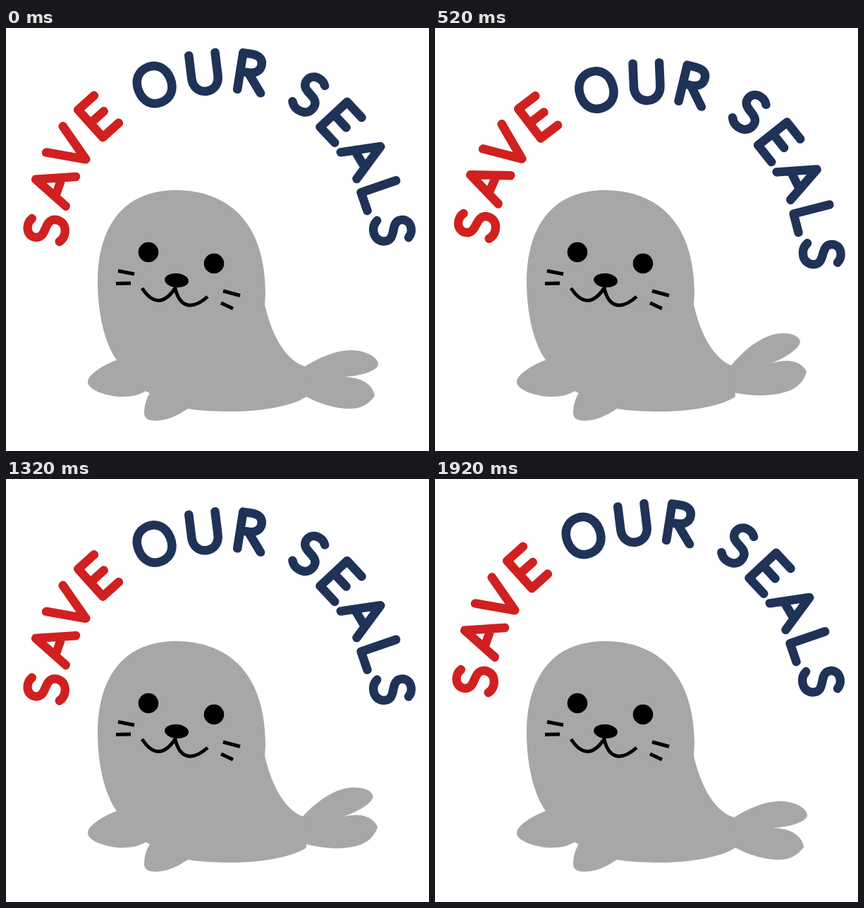
An HTML page for the animation above (1.96 s loop, 600x600 px).

```html
<!DOCTYPE html>
<html lang="en">
<head>
<meta charset="utf-8">
<title>Save our seals</title>
<style>
  html, body { margin: 0; width: 100%; height: 100%; overflow: hidden; background: #fff; }
  svg { display: block; width: 100vw; height: 100vh; }
  text { font-family: Lato, sans-serif; font-weight: 100; stroke-linejoin: round; }
  .ink { fill: none; stroke: #000; stroke-width: 5; }
</style>
</head>
<body>
<svg viewBox="0 0 600 600">
  <g fill="#a7a7a7">
    <path id="tail" d="M424 480C445 467 468 457 490 457C510 457 528 467 528 477C528 486 503 494 478 495
      C508 495 521 508 523 522C514 535 502 540 487 540C467 540 445 533 426 523L400 510Z"/>
    <path d="M157 471C140 447 130 405 130 360C130 280 168 230 241 230C310 230 368 270 368 378L367 392
      C374 425 392 470 424 480L426 523C405 537 360 544 320 544C300 544 275 543 258 540
      C246 548 230 557 213 557C202 557 196 554 196 546C196 538 198 527 204 518L198 515
      C190 520 180 523 165 523C145 523 116 514 116 502C116 491 140 477 157 471Z"/>
  </g>
  <circle cx="202" cy="318" r="14.3"/>
  <circle cx="295" cy="334" r="14.3"/>
  <ellipse cx="242" cy="358" rx="17" ry="10" transform="rotate(5 242 358)"/>
  <path class="ink" d="M193 369Q216 404 240 369C247 399 266 399 286 381"/>
  <path class="ink" d="M159 344.5L182 349M156 362.5L177 362M308 373L332 379.5M305 390L322 398"/>
  <g id="title"></g>
</svg>
<script>
const tail = document.getElementById('tail');
const title = document.getElementById('title');
const pen = document.createElement('canvas').getContext('2d');

// Metrics of a glyph relative to the font size
function measure(char) {
  pen.font = '100 1000px Lato, sans-serif';
  const m = pen.measureText(char);
  return {
    left: -m.actualBoundingBoxLeft / 1000,
    right: m.actualBoundingBoxRight / 1000,
    cap: m.actualBoundingBoxAscent / 1000
  };
}

// Thicken the thin face to a round line of fixed weight and height
const LINE = 14, HEIGHT = 65;
const bar = measure('I');
const stem = bar.right - bar.left;
const size = (HEIGHT - LINE) / (bar.cap - stem);
const outline = LINE - stem * size;

// Letter, centre x, centre y, angle
const letters = [
  ['S', 57, 286, -84], ['A', 67, 223, -71], ['V', 91, 172, -57.5], ['E', 131, 125.5, -42],
  ['O', 210.5, 80.5, -22], ['U', 281, 63, -7], ['R', 349, 63.5, 9],
  ['S', 429.5, 94, 30], ['E', 475, 133.5, 47], ['A', 509, 181.5, 59], ['L', 533, 238, 71], ['S', 548, 286, 84]
];

letters.forEach(([char, x, y, angle], i) => {
  const { left, right } = measure(char);
  const color = i < 4 ? '#d0201f' : '#1f3257';
  const el = document.createElementNS('http://www.w3.org/2000/svg', 'text');
  const attrs = {
    x: -(left + right) / 2 * size,
    y: bar.cap / 2 * size,
    'font-size': size,
    fill: color,
    stroke: color,
    'stroke-width': outline,
    transform: `translate(${x} ${y}) rotate(${angle})`
  };
  for (const name in attrs) el.setAttribute(name, attrs[name]);
  el.textContent = char;
  title.append(el);
});

const STEP = 40, STEPS = 49, CYCLE = 24;

function draw(now) {
  const step = Math.floor(now / STEP) % STEPS;
  const phase = step % CYCLE / (CYCLE / 2);
  const swing = 1 - Math.abs(1 - phase);
  const turn = step < CYCLE ? 5 * swing : 0; // the arc only turns in the first cycle
  tail.setAttribute('transform', `rotate(${-20 * swing} 418 492)`);
  title.setAttribute('transform', `translate(0 ${15.2 * swing}) rotate(${turn} 302 306)`);
}

const start = performance.now();
function loop() {
  draw(performance.now() - start);
  requestAnimationFrame(loop);
}
loop();
</script>
</body>
</html>
```
